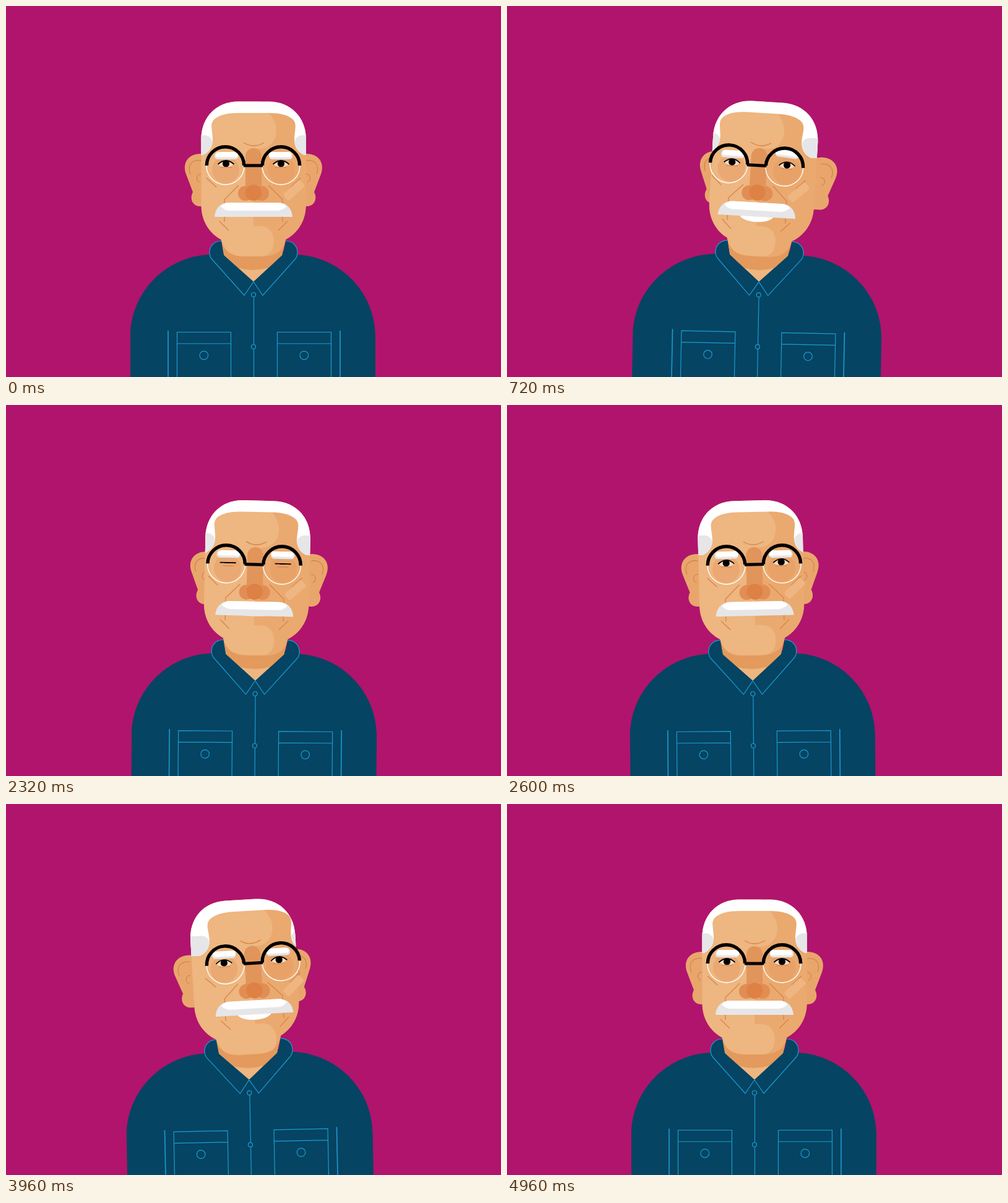
Write an HTML page with a canvas that moves like this. It is 800 px wide and 600 px high and loops after 5.8 s.

```html
<!DOCTYPE html>
<html>
<head>
<meta charset="utf-8">
<style>
html, body { margin: 0; overflow: hidden; background: #b1146c; }
canvas { display: block; }
</style>
</head>
<body>
<canvas id="stage" width="800" height="600"></canvas>
<script>
const ctx = document.getElementById('stage').getContext('2d');
const LOOP = 5800;
const SKIN = '#eaa96f', LIGHT = '#eeb680', EAR = '#e8a66c', CREASE = '#d98348';
const SHIRT = '#054462', SEAM = '#1c9bd3', GREY = '#e6e6e8';

const shape = {
  body: new Path2D('M201 660 V535 C201 463 258 405 329 402 L352 396 H446 L469 402 C540 405 597 463 597 535 V660 Z'),
  neck: new Path2D('M347 374 L352 403 L400 446 L446 403 L453 374 Z'),
  collar: new Path2D('M348 380 C335 380 329 390 329 398 C329 405 331 408 335 412 L385 468 L400 446 L352 403 Z'),
  collarEdge: new Path2D('M348 380 C335 380 329 390 329 398 C329 405 331 408 335 412 L385 468 L400 446'),
  head: new Path2D('M315.5 215 C315.5 180 340 154.5 375 154.5 H425 C460 154.5 485 180 485 215 V322 C485 348 471 368 452 378 C448 396 436 405 415 405 H385 C364 405 352 396 348 378 C329 368 315.5 348 315.5 322 Z'),
  hair: new Path2D('M270 140 H530 V241 H482 Q466 234 466 216 C466 200 472 190 462 182 Q450 173 425 173 H375 Q350 173 338 182 C328 190 334 200 334 216 Q334 234 318 241 H270 Z'),
  light: new Path2D('M270 150 H408 C424 173 437 183 437 201 C437 219 425 231 408 231 H400 V356 H411 C424 356 433 366 433 380 C433 396 425 405 411 405 H270 Z'),
  ear: new Path2D('M350 240 H322 C300 235 283 250 291 272 L302 301 C296 312 302 324 314 324 H350 Z'),
  earLines: new Path2D('M298 272 C292 255 303 248 316 250 M316 272 C307 271 306 283 313 285'),
  creases: new Path2D('M376 290 L353 313 V322 M353 340 V349 M345 348 L360 363 M324 278 L340 293'),
  frown: new Path2D('M384 221 Q400 231 417 221'),
  moustache: new Path2D('M337 341 C338 328 346 318 360 318 H440 C454 318 462 328 463 341 Z'),
  moustacheTop: new Path2D('M347 324 Q352 318 360 318 H440 Q448 318 453 324 Q447 331 438 331 H362 Q353 331 347 324 Z')
};

const clamp = x => Math.min(1, Math.max(0, x));
const ease = (t, a, b) => (1 - Math.cos(Math.PI * clamp((t - a) / (b - a)))) / 2;
const pulse = (t, a, b, n) => t < a || t > b ? 0 : (1 - Math.cos(2 * Math.PI * n * (t - a) / (b - a))) / 2;

function fill(path, color) { ctx.fillStyle = color; ctx.fill(path); }
function line(path, color, width) {
  ctx.strokeStyle = color;
  ctx.lineWidth = width;
  ctx.stroke(path);
}
function circle(x, y, r, color) {
  const p = new Path2D();
  p.arc(x, y, r, 0, 2 * Math.PI);
  if (color) fill(p, color);
  return p;
}
function box(x, y, w, h, r, color) {
  const p = new Path2D();
  p.roundRect(x, y, w, h, r);
  fill(p, color);
}
function group(draw) { ctx.save(); draw(); ctx.restore(); }
function rotateAt(deg, x, y) {
  ctx.translate(x, y);
  ctx.rotate(deg * Math.PI / 180);
  ctx.translate(-x, -y);
}
function bothSides(draw) {
  group(() => draw(0));
  group(() => { ctx.translate(800, 0); ctx.scale(-1, 1); draw(1); });
}

function pose(t) {
  const turn = ease(t, 0, 600) - 2 * ease(t, 1920, 3000) + ease(t, 4240, 4960);
  return {
    turn,
    breath: pulse(t, 440, 1640, 2) + pulse(t, 3040, 4560, 3),
    smile: ease(t, 40, 600) - ease(t, 2060, 2480) + ease(t, 3160, 3560) - ease(t, 4620, 4940),
    lift: pulse(t, 2900, 3360, 1),
    blink: pulse(t, 1400, 1720, 1) + pulse(t, 2160, 2500, 1),
    browRight: ease(t, 300, 700) - ease(t, 1240, 1560),
    browLeft: ease(t, 2800, 3180) - ease(t, 3640, 4000)
  };
}

function drawShirt(breath) {
  group(() => {
    ctx.translate(399, 0);
    ctx.scale(1 + .015 * breath, 1);
    ctx.translate(-399, 0);
    fill(shape.body, SHIRT);
  });
  group(() => {
    fill(shape.neck, LIGHT);
    ctx.clip(shape.neck);
    const shade = new Path2D();
    shade.ellipse(399, 385, 60, 42, 0, 0, 7);
    fill(shade, '#e39a5c');
  });
  bothSides(() => {
    fill(shape.collar, SHIRT);
    line(shape.collarEdge, SEAM, 1.2);
  });
  line(new Path2D('M400.5 471 V547 M400.5 555 V640'), SEAM, 1.2);
  for (const y of [467, 551]) line(circle(400, y, 3.5), SEAM, 1.2);
  for (const x of [276.5, 438.5]) {
    line(new Path2D(`M${x} 640 V527.5 h87 V640 M${x} 546 h87`), SEAM, 1.2);
    line(circle(x + 43.3, 565, 6.8), SEAM, 1.2);
  }
  line(new Path2D('M262 525 V640 M540 525 V640'), SEAM, 1.6);
}

function drawEye(blink) {
  const open = 1 - blink;
  const top = `M342.5 256 Q355.5 ${256 - 12 * open} 368.5 256`;
  group(() => {
    const lids = new Path2D(`${top} Q355.5 ${258 + 8 * open} 342.5 256 Z`);
    fill(lids, '#f6dcc4');
    ctx.clip(lids);
    circle(355.5, 255, 5.6, '#000');
  });
  line(new Path2D(top), '#000', 1.8);
  line(new Path2D('M347 261 H365'), CREASE, 1.2);
}

function drawBrow(raise, tilt) {
  ctx.translate(0, -raise);
  rotateAt(tilt, 356, 242);
  box(337, 236, 38, 12, [6, 4, 5, 5], GREY);
  box(339, 236, 36, 8.5, [5, 4, 3, 4], '#fff');
}

function drawFace(p, shift) {
  group(() => {
    ctx.clip(shape.head);
    fill(shape.head, SKIN);
    ctx.translate(shift, 0);
    fill(shape.light, LIGHT);
    ctx.clip(shape.hair, 'evenodd');
    ctx.fillStyle = '#fff';
    ctx.fillRect(270, 140, 260, 102);
    bothSides(() => box(270, 209, 64, 40, [0, 13, 0, 0], GREY));
  });

  ctx.translate(shift, 0);
  line(shape.frown, CREASE, 1.3);
  bothSides(() => {
    circle(355, 265, 22, 'rgba(228,151,92,.4)');
    line(shape.creases, CREASE, 1.3);
  });
  group(() => {
    rotateAt(-43, 465.5, 298);
    box(447, 291, 37, 14, 4, '#efb681');
  });

  group(() => {
    ctx.translate(shift * .16, 0);
    box(387, 230, 26, 72, [13, 13, 0, 0], '#e1955b');
    for (const x of [387, 413]) circle(x, 303, 12, '#e18d54');
    circle(400, 302, 13, '#de8145');
  });

  bothSides(() => drawEye(p.blink));
  bothSides(side => side
    ? drawBrow(5 * p.browRight + 2 * p.browLeft, -4 * p.browRight)
    : drawBrow(4.5 * p.browLeft, 0));

  if (p.smile > .01) {
    const mouth = new Path2D();
    mouth.ellipse(400, 338, 28, 11.5 * p.smile, 0, 0, Math.PI);
    fill(mouth, '#fff');
  }
  ctx.translate(0, -4.5 * p.lift);
  fill(shape.moustache, GREY);
  fill(shape.moustacheTop, '#fff');
}

function drawGlasses() {
  for (const x of [354.5, 444.5]) {
    const lower = new Path2D(), upper = new Path2D();
    lower.arc(x, 258.5, 30.5, 0, Math.PI);
    upper.arc(x, 258, 30.2, Math.PI, 2 * Math.PI);
    line(lower, '#fff', 1.4);
    line(upper, '#000', 5.4);
  }
  line(new Path2D('M384 258 H415'), '#000', 5);
}

function draw(t) {
  const p = pose(t), right = p.turn > 0;
  ctx.fillStyle = '#b1146c';
  ctx.fillRect(0, 0, 800, 600);
  group(() => {
    rotateAt(1.15 * p.turn, 400, 800);
    drawShirt(p.breath);
    rotateAt(2.15 * p.turn, 400, 368);
    group(() => {
      ctx.translate(p.turn * (right ? 8 : 3.5), 0);
      bothSides(() => {
        fill(shape.ear, EAR);
        line(shape.earLines, CREASE, 1.3);
      });
    });
    group(() => drawFace(p, p.turn * (right ? -7 : -12)));
    ctx.translate(p.turn * (right ? -11 : -15), 0);
    drawGlasses();
  });
}

function frame() {
  draw(performance.now() % LOOP);
  requestAnimationFrame(frame);
}
frame();
</script>
</body>
</html>
```
